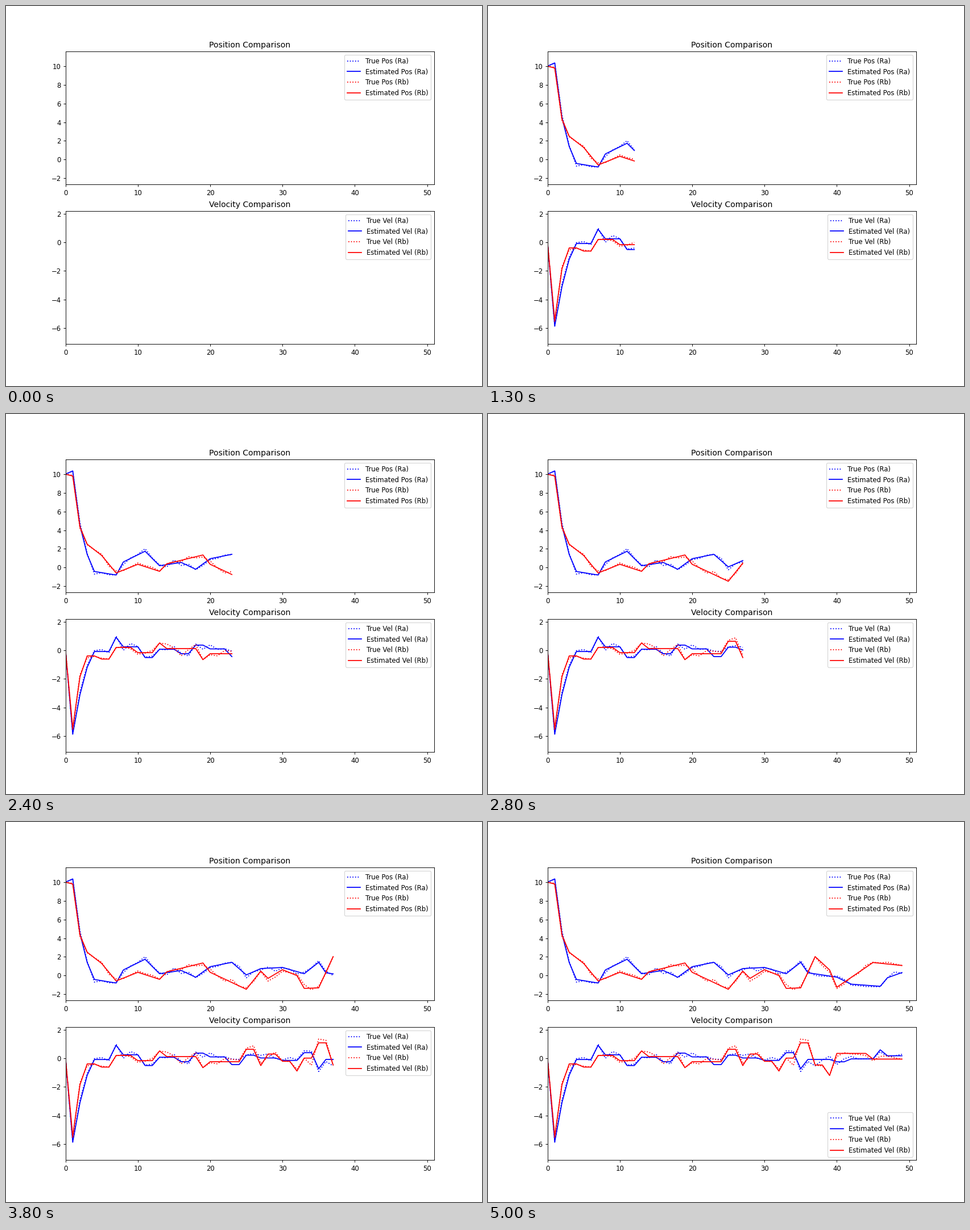
A matplotlib script that plays this animation: 837 by 669 pixels, repeating every 5.1 s.

```python
import matplotlib.pyplot as plt
import numpy as np
from matplotlib.animation import FuncAnimation

STEPS = 50
DPI = 83.7

rng = np.random.default_rng(4)
steps = np.arange(STEPS)


def track(*turns):
    """Position and velocity of a robot that moves between turning points."""
    position = np.interp(np.arange(STEPS + 1), *zip(*turns))
    gain = np.where(steps < 3, 1, 0.65)  # the controller calms after the start
    velocity = gain * np.diff(position)
    velocity[0] = 0
    return position[:-1], velocity


def disturbed(values, spread):
    """Values with a small random deviation at every step but the first."""
    return values + rng.normal(0, spread, STEPS) * (steps > 0)


pos_a, vel_a = track(
    (0, 10), (1, 10.35), (2, 4.5), (3, 1.4), (4, -.42), (7, -.8), (8, .6),
    (11, 1.75), (13, .2), (16, .55), (18, -.18), (20, .95), (23, 1.42),
    (25, .07), (27, .75), (30, .87), (33, .2), (35, 1.42), (36, .3),
    (40, -.17), (42, -.92), (46, -1.15), (47, -.23), (50, .6))

pos_b, vel_b = track(
    (0, 10), (1, 9.8), (2, 4.35), (3, 2.5), (5, 1.3), (7, -.58), (10, .35),
    (13, -.4), (14, .4), (19, 1.35), (20, .35), (25, -1.47), (27, .48),
    (28, -.3), (30, .63), (32, 0), (33, -1.37), (35, -1.32), (37, 2.03),
    (39, .6), (40, -1.25), (45, 1.4), (50, 1))

# The tiny excess keeps the pixel size from being rounded down.
fig, (pos_ax, vel_ax) = plt.subplots(
    2, 1, figsize=(837.001 / DPI, 669.001 / DPI), dpi=DPI)


def add_panel(ax, title, name, limits, spread, estimates):
    """Set up one chart and return its empty lines paired with their data."""
    traces = []
    for robot, color, estimate in zip(("Ra", "Rb"), "br", estimates):
        for kind, style, values in (
                ("True", ":", disturbed(estimate, spread)),
                ("Estimated", "-", estimate)):
            line, = ax.plot([], [], color + style,
                            label=f"{kind} {name} ({robot})")
            traces.append((line, values))
    ax.set_title(title)
    ax.set_xlim(0, STEPS + 1)
    ax.set_ylim(*limits)
    ax.legend(loc="best")
    return traces


traces = add_panel(pos_ax, "Position Comparison", "Pos", (-2.68, 11.56),
                   0.17, (pos_a, pos_b))
traces += add_panel(vel_ax, "Velocity Comparison", "Vel", (-7.13, 2.18),
                    0.17, (vel_a, vel_b))


def update(count):
    for line, values in traces:
        line.set_data(steps[:count], values[:count])
    return [line for line, _ in traces]


animation = FuncAnimation(fig, update, frames=STEPS + 1, interval=100,
                          repeat=True, repeat_delay=0, blit=False)
plt.show()
```
